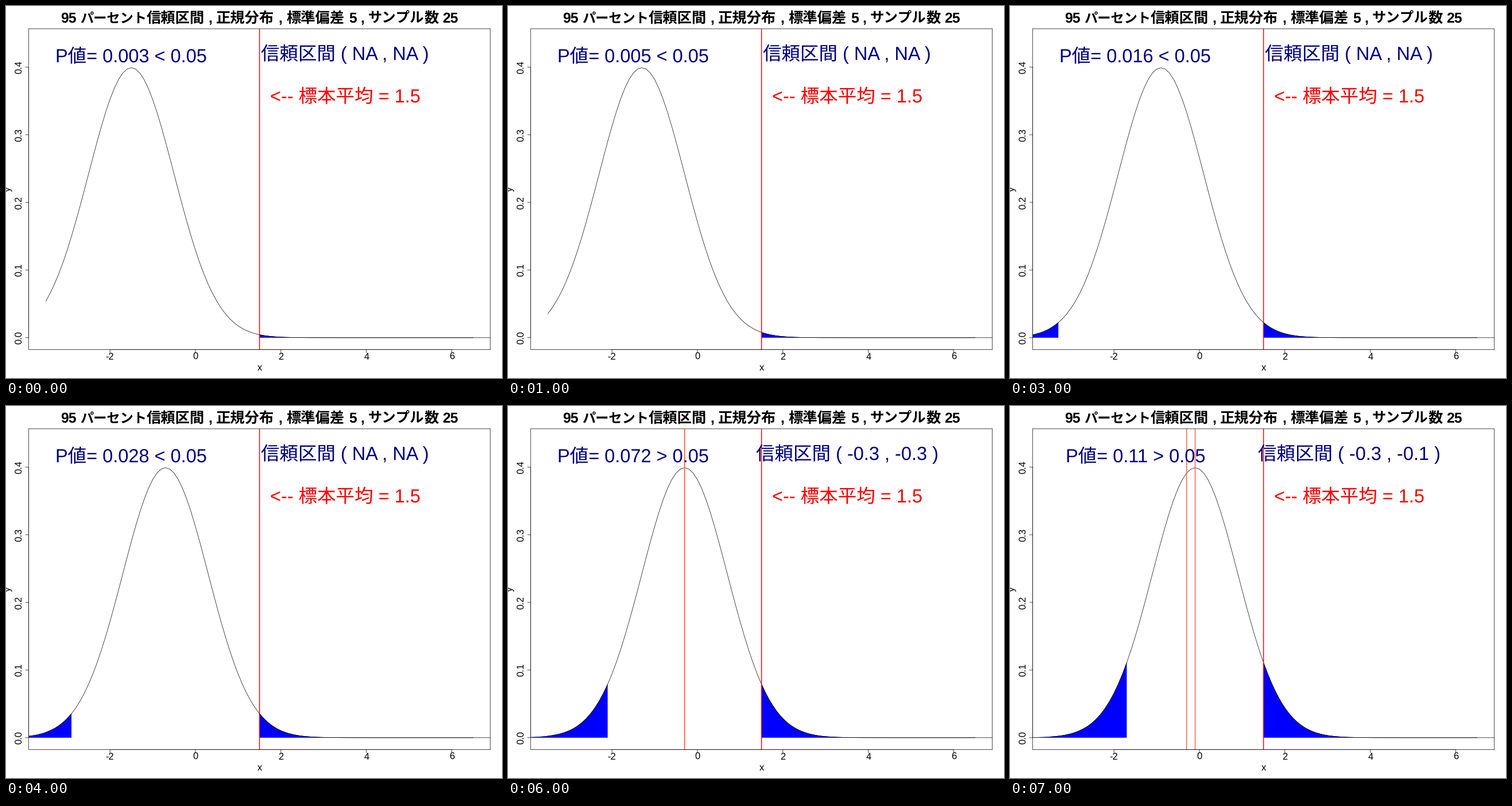
A matplotlib script that plays this animation: 864x648 px, repeating every 8000 ms.

```python
import math

import matplotlib.pyplot as plt
import numpy as np
from matplotlib.animation import FuncAnimation
from matplotlib.patches import Polygon

W, H, DPI = 864, 648, 72          # at 72 dpi one point is one pixel
LEFT, RIGHT, TOP, BOTTOM = 39.6, 843.6, 39.8, 598.5
THIN, THICK = 0.7, 1.5
SMALL, LARGE = 16.5, 32.5
MEAN = 1.5                        # sample mean
ALPHA = 0.05
STEPS = 8

plt.rcParams.update({
    "font.family": ["Liberation Sans", "Noto Sans CJK JP"],
    "text.hinting": "none",
    "path.snap": False,
    "lines.solid_capstyle": "round",
    "lines.solid_joinstyle": "round",
})


def density(x, mu):
    return np.exp(-(x - mu) ** 2 / 2) / math.sqrt(2 * math.pi)


def label(x, y, text, size=SMALL, **style):
    """Text with its baseline at pixel (x, y), counted from the top left."""
    style = {"ha": "center", "va": "baseline", "rotation_mode": "anchor", **style}
    return fig.text(x / W, 1 - y / H, text, fontsize=size, **style)


def to_px(x, y):
    px = LEFT + (x - x_lim[0]) / (x_lim[1] - x_lim[0]) * (RIGHT - LEFT)
    py = BOTTOM - (y - y_lim[0]) / (y_lim[1] - y_lim[0]) * (BOTTOM - TOP)
    return px, py


fig = plt.figure(figsize=(W / DPI, H / DPI), dpi=DPI, facecolor="white")
ax = fig.add_axes([LEFT / W, 1 - BOTTOM / H, (RIGHT - LEFT) / W, (BOTTOM - TOP) / H])

y_top = 1.1 * float(density(0, 0))
x_lim = (-3.9, 6.9)
y_lim = (-0.04 * y_top, 1.04 * y_top)
ax.set(xlim=x_lim, ylim=y_lim, xticks=[], yticks=[])
for spine in ax.spines.values():
    spine.set_linewidth(THIN)


def draw_axes():
    tick = 5.8
    dx = tick * (x_lim[1] - x_lim[0]) / (RIGHT - LEFT)
    dy = tick * (y_lim[1] - y_lim[0]) / (BOTTOM - TOP)
    rule = {"color": "black", "lw": THIN, "clip_on": False, "zorder": 3}
    ax.plot([-2, 6], [y_lim[0]] * 2, **rule)
    ax.plot([x_lim[0]] * 2, [0, 0.4], **rule)
    for x in range(-2, 7, 2):
        ax.plot([x, x], [y_lim[0], y_lim[0] - dy], **rule)
        label(to_px(x, 0)[0], 615.6, str(x))
    for y in np.arange(5) / 10:
        ax.plot([x_lim[0], x_lim[0] - dx], [y, y], **rule)
        label(28.6, to_px(0, y)[1], f"{y:.1f}", rotation=90)
    label((LEFT + RIGHT) / 2, 635, "x")
    label(8.5, (TOP + BOTTOM) / 2, "y", rotation=90)


def draw_title():
    latin, kanji = 24.7, 25.3
    words = [
        (95, "95", latin), (129.5, "パーセント", 23.2), (244.5, "信頼区間", kanji),
        (352.2, ",", latin), (366, "正規分布", kanji),
        (474.2, ",", latin), (488, "標準偏差", kanji),
        (597.2, "5", latin), (617.2, ",", latin),
        (631, "サンプル", 24.4), (728, "数", kanji), (760, "25", latin),
    ]
    for x, word, size in words:
        label(x, 28.8, word, size, ha="left", weight="bold")


draw_axes()
draw_title()

xs = np.linspace(-3.5, 6.5, 101)
curve, = ax.plot(xs, density(xs, 0), color="black", lw=THIN, zorder=2)
tails = [
    ax.add_patch(Polygon([(0, 0), (1, 0), (1, 1)], facecolor="blue",
                         edgecolor="none", lw=0, zorder=1.8))
    for _ in range(2)
]
rims = [ax.plot([], [], color="black", lw=THIN, zorder=1.9)[0] for _ in range(2)]
ax.axvline(MEAN, color="red", lw=THICK, zorder=2.4)
bounds = [ax.axvline(0, color="tomato", lw=THICK, zorder=2.3) for _ in range(2)]

p_text = label(to_px(-1.5, 0)[0], 97, "", LARGE, color="navy")
ci_text = label(to_px(3.5, 0)[0], 94.4, "", LARGE, color="navy")
label(to_px(3.5, 0)[0], 167.8, f"<-- 標本平均 = {MEAN}", LARGE, color="red")


def shade(tail, rim, start, stop, mu):
    x = np.linspace(start, stop, 101)
    y = density(x, mu)
    rim.set_data(x, y)
    tail.set_xy(np.vstack([[start, 0], np.column_stack([x, y]), [stop, 0]]))


def mean_at(i):
    return round(-1.5 + 0.2 * i, 1)


def p_value(mu):
    return math.erfc((MEAN - mu) / math.sqrt(2))


def update(i):
    mu = mean_at(i)
    p = p_value(mu)
    curve.set_ydata(density(xs, mu))
    shade(tails[0], rims[0], -12, 2 * mu - MEAN, mu)
    shade(tails[1], rims[1], MEAN, 10, mu)

    sign = "<" if p < ALPHA else ">"
    p_text.set_text(f"P値= {round(p, 3):g} {sign} {ALPHA}")

    # means tried so far that the test does not reject
    kept = [m for m in map(mean_at, range(i + 1)) if p_value(m) >= ALPHA]
    low, high = (min(kept), max(kept)) if kept else ("NA", "NA")
    ci_text.set_text(f"信頼区間 ( {low} , {high} )")
    for line, x in zip(bounds, (low, high)):
        line.set_visible(bool(kept))
        if kept:
            line.set_xdata([x, x])
    return [curve, *tails, *rims, *bounds, p_text, ci_text]


anim = FuncAnimation(fig, update, frames=STEPS, interval=1000, repeat=True,
                     repeat_delay=0, blit=False)
plt.show()
```
